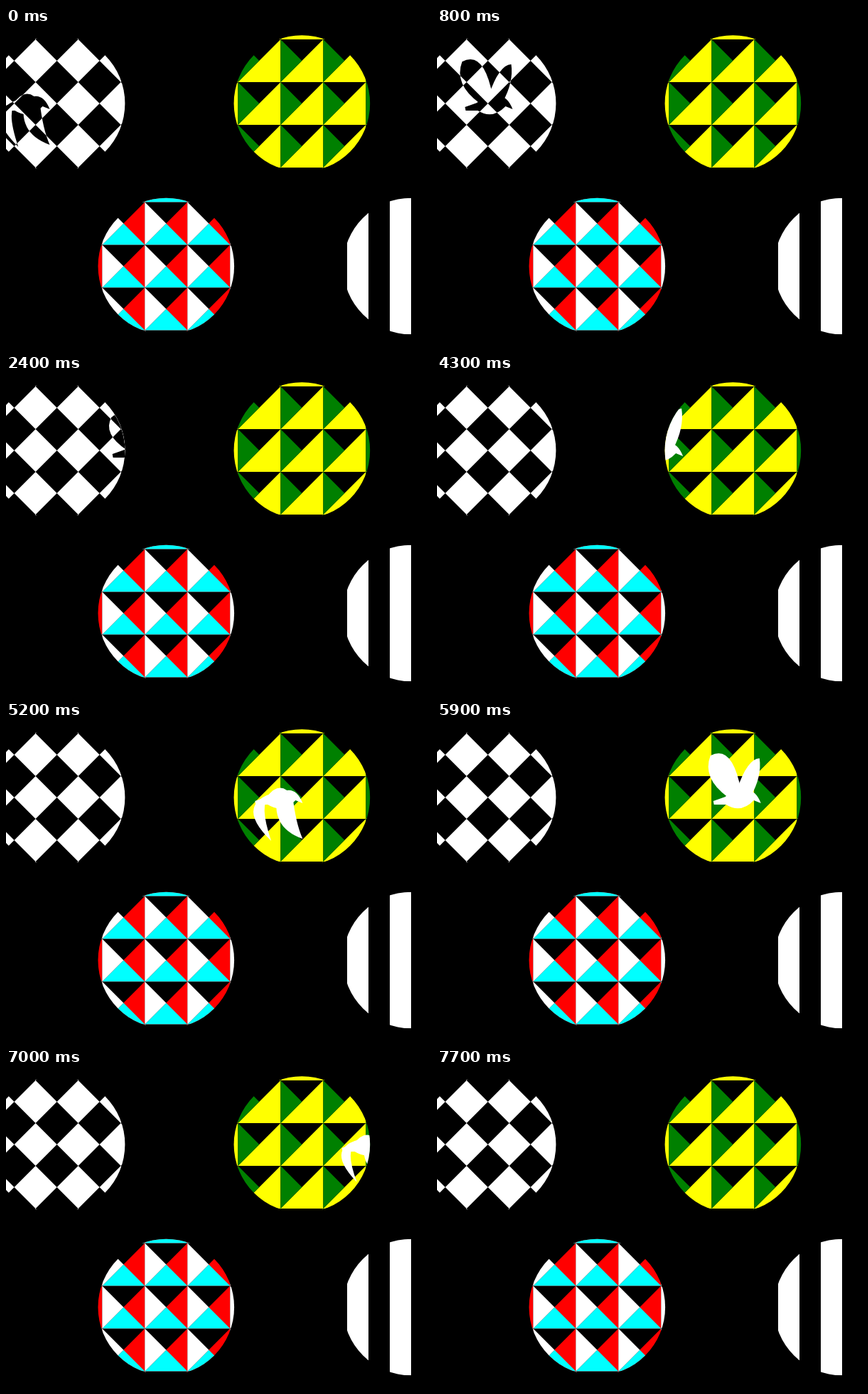
An HTML page with a canvas that plays this animation: 598 px wide and 448 px high, repeating every 7.9 s.

```html
<!DOCTYPE html>
<html lang="en">
<head>
<meta charset="utf-8">
<title>Bird crossing patterned discs</title>
<style>
html, body { margin: 0; width: 100%; height: 100%; overflow: hidden; background: #000; }
canvas { display: block; }
</style>
</head>
<body>
<canvas id="stage" width="598" height="448"></canvas>
<script>
const stage = document.getElementById('stage');
const ctx = stage.getContext('2d');
const layer = document.createElement('canvas');
layer.width = stage.width;
layer.height = stage.height;
const pen = layer.getContext('2d');

const LOOP = 7900, FLAP = 1700, STEP = 100, RADIUS = 95.8, CELL = 60, HALF = CELL / 2;

// Bird geometry, measured from the tip of the beak.
const body = new Path2D('M0 0Q-8-20-22-18Q-36-28-50-9L-67-3-66 2-49 2Q-28 15-10-4Z');
const farWing = {
  shoulder: [-28, -18], base: [-46, -8],
  up: { lead: [-38, -86], tip: [-72, -71], trail: [-84, -36] },
  down: { lead: [-102, -2], tip: [-44, 54], trail: [-62, 0] }
};
const nearWing = {
  shoulder: [-34, -18], base: [-14, -10],
  up: { lead: [-18, -66], tip: [-2, -67], trail: [2, -40] },
  down: { lead: [-48, 34], tip: [0, 51], trail: [-10, 28] }
};

function polygon(color, ...points) {
  ctx.beginPath();
  for (const [x, y] of points) ctx.lineTo(x, y);
  ctx.fillStyle = color;
  ctx.fill();
}

function inDisc(cx, cy, draw) {
  ctx.save();
  ctx.beginPath();
  ctx.arc(cx, cy, RADIUS, 0, 2 * Math.PI);
  ctx.clip();
  draw();
  ctx.restore();
}

function eachCell(cx, cy, draw) {
  for (let row = -2; row < 3; row++)
    for (let col = -2; col < 3; col++) draw(cx + col * CELL, cy + row * CELL);
}

function diamonds(cx, cy) {
  inDisc(cx, cy, () => eachCell(cx + HALF, cy, (x, y) =>
    polygon('#fff', [x, y - HALF], [x + HALF, y], [x, y + HALF], [x - HALF, y])));
}

// Each cell is split by its diagonals into four triangles; the top one stays black.
function pyramids(cx, cy, left, right, bottom) {
  inDisc(cx, cy, () => eachCell(cx, cy, (x, y) => {
    const l = x - HALF, r = x + HALF, t = y - HALF, b = y + HALF;
    polygon(right, [r, t], [r, b], [l, b]);
    if (bottom !== right) polygon(bottom, [l, b], [r, b], [x, y]);
    polygon(left, [l, t], [l, b], [x, y]);
  }));
}

function stripes(cx, cy) {
  inDisc(cx, cy, () => {
    ctx.fillStyle = '#fff';
    for (const x of [-3, -1]) ctx.fillRect(cx + x * HALF, cy - RADIUS, HALF, 2 * RADIUS);
  });
}

function fillWing({ shoulder, base, up, down }, lift) {
  const at = key => down[key].map((v, i) => v + (up[key][i] - v) * lift);
  pen.beginPath();
  pen.moveTo(...shoulder);
  pen.quadraticCurveTo(...at('lead'), ...at('tip'));
  pen.quadraticCurveTo(...at('trail'), ...base);
  pen.fill();
}

function drawBird(t) {
  const angle = 2 * Math.PI * t / FLAP;
  const lift = (1 - Math.cos(angle - 0.19)) / 2;
  pen.clearRect(0, 0, layer.width, layer.height);
  pen.save();
  pen.translate(56.5 + 0.0685 * t + 5 * Math.cos(angle), 114);
  pen.fillStyle = '#fff';
  fillWing(farWing, lift);
  fillWing(nearWing, lift);
  pen.fill(body);
  pen.restore();
}

function showBird(cx, cy, blend) {
  inDisc(cx, cy, () => {
    ctx.globalCompositeOperation = blend;
    ctx.filter = 'blur(0.7px)';
    ctx.drawImage(layer, 0, 0);
  });
}

function draw(time) {
  const t = Math.floor(time % LOOP / STEP) * STEP;
  ctx.fillStyle = '#000';
  ctx.fillRect(0, 0, stage.width, stage.height);
  diamonds(71.6, 106);
  pyramids(416.4, 106, '#008000', '#ff0', '#ff0');
  pyramids(225.3, 334.5, '#fff', '#f00', '#0ff');
  stripes(570, 334.5);
  if (t >= 7700) return;
  drawBird(t);
  showBird(71.6, 106, 'difference');   // inverts the checkerboard
  showBird(416.4, 106, 'source-over');
}

const start = performance.now();
function tick() {
  draw(performance.now() - start);
  requestAnimationFrame(tick);
}
tick();
</script>
</body>
</html>
```
